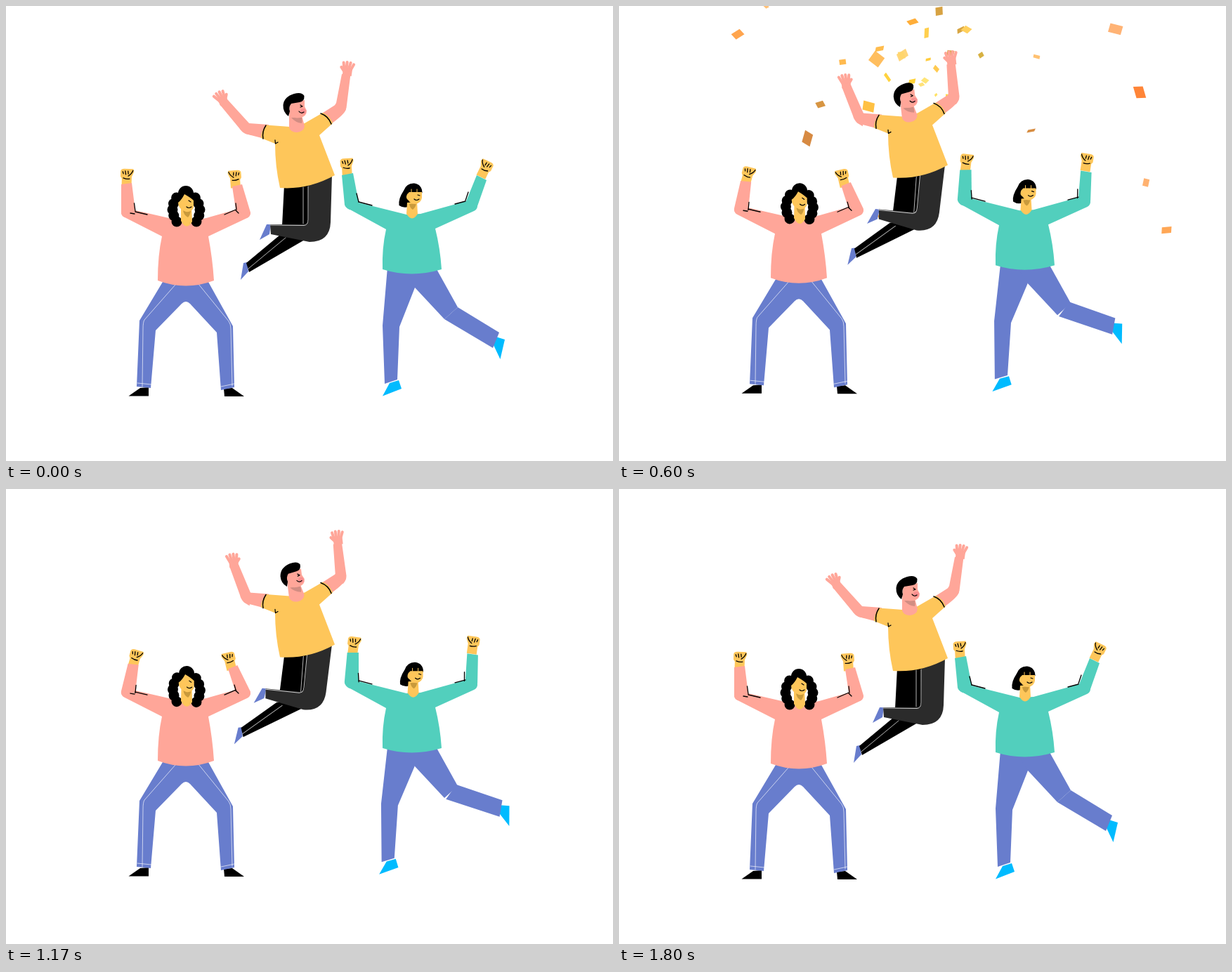
Write an HTML page with a canvas that moves like this. It is 864 px wide and 648 px high and loops after 1830 ms.

```html
<!DOCTYPE html>
<html lang="en">
<head>
<meta charset="utf-8">
<title>Celebration</title>
<style>
html, body { margin: 0; width: 100%; height: 100%; overflow: hidden; background: #fff; }
canvas { display: block; }
</style>
</head>
<body>
<canvas id="stage" width="864" height="648"></canvas>
<script>
const ctx = document.getElementById('stage').getContext('2d');
const LOOP = 1830, STEP = 30;
const PINK = '#ffa699', GOLD = '#fec65a', GREEN = '#52cfbd', BLUE = '#687dcd',
      SKY = '#00bbff', BLACK = '#000', DARK = '#2b2b2b', SHADE = '#c99a3c';

// ---- drawing helpers ----
const paths = new Map();
function path(d) {
  if (!paths.has(d)) paths.set(d, new Path2D(d));
  return paths.get(d);
}
function fill(color, d) {
  ctx.fillStyle = color;
  ctx.fill(path(d));
}
function line(d, color = BLACK, width = 1.3) {
  ctx.strokeStyle = color;
  ctx.lineWidth = width;
  ctx.stroke(path(d));
}
function dot(color, x, y, r) {
  ctx.fillStyle = color;
  ctx.beginPath();
  ctx.arc(x, y, r, 0, 7);
  ctx.fill();
}
function shift(x, y, draw) {
  ctx.save();
  ctx.translate(x, y);
  draw();
  ctx.restore();
}
function turn(x, y, deg, draw) {
  ctx.save();
  ctx.translate(x, y);
  ctx.rotate(deg * Math.PI / 180);
  ctx.translate(-x, -y);
  draw();
  ctx.restore();
}
function fist(x, y, deg, flip = 1) {
  shift(x, y, () => {
    ctx.rotate(deg * Math.PI / 180);
    ctx.scale(flip, 1);
    fill(GOLD, 'M-9,-8Q-8,-11 -4,-11L9,-11L10,-7L7,0L7,14L-7,14L-7,3L-9,0Z');
    line('M-6,-7l1,3M-2.5,-8l1,5M1.5,-8l.5,4M8.5,-9Q7,-4 2,-1M-5,2q5,2 9,1', BLACK, 1.3);
  });
}
// Open hand: four fingers fanned over a palm, thumb to one side
function hand(x, y, deg, thumb) {
  shift(x, y, () => {
    ctx.rotate(deg * Math.PI / 180);
    fill(PINK, 'M-6,2L-6,-7Q1,-13 7,-7L7,2Z');
    for (let i = 0; i < 4; i++) {
      const a = (i - 1.5) * .3 - thumb * .05;
      line(`M${(i - 1.5) * 3},-6L${17 * Math.sin(a)},${-17 * Math.cos(a)}`, PINK, 4);
    }
    line(`M${thumb * 4},-3L${thumb * 9},-9`, PINK, 4);
  });
}

// ---- woman in pink ----
function curls() {
  dot(BLACK, 256, 267, 11);
  for (const side of [-1, 1])
    for (let i = 0; i < 5; i++)
      dot(BLACK, 256 + side * (12 + 7 * Math.sin(i * .7 + .2)) + (side > 0 ? i * .5 : 0), 273 + i * 8.5, 7.5);
}

function pinkWoman(q) {
  shift(0, -5 * q, () => {
    fill(BLACK, 'M174.5,555.5L191,544L203,543L203,555.5ZM310,545L322,544L339,556L311,556Z');
    fill(BLUE, 'M223,393L190,448L186,542L206,544L213,462L250,424Q256,418 262,424L300,465L306,547L325,543L323,456L288,393Z');
    line('M241,397L197,447Q195,450 195,460L194,542M187,537L207,539M274,396L317,449Q320,453 320,460L322,541M306,542L325,538',
      'rgba(255,255,255,.65)', 1);
    turn(174, 293, 17.5 * q, () => {
      fist(172, 243, 2);
      fill(PINK, 'M164,254L179,252L184,292L182,301L169,301Q164,299 164,294Z');
    });
    turn(338, 294, -12 * q, () => {
      fist(326, 245, -4, -1);
      fill(PINK, 'M322,257L336,254L348,294Q348,299 343,302L330,302L327,290Z');
    });
    fill(PINK, 'M164,293Q164,299 169,301L222,328Q216,355 216,391Q256,406 296,391Q294,360 288,328L343,302Q348,300 348,294L327,290L285,302L264,306L249,306L184,291Z');
    turn(174, 293, 17.5 * q, () => line('M182.5,281L184,292'));
    turn(338, 294, -12 * q, () => line('M327,281L328,290'));
    line('M184,293L201,297M177,295L183,296M327,290L311,297M327,291L331,295');
    turn(257, 306, 2 * q, () => {
      curls();
      fill(GOLD, 'M249,287L249,306Q257,321 265,307L264,285Z');
      fill(SHADE, 'M252,291L263,292Q262,298 259,301Q253,298 252,291Z');
      fill(GOLD, 'M254,268Q263,273 267,277L267,287Q264,294 256,293Q245,289 245,280Q250,276 254,268Z');
      line('M260,277L263,279M257,286Q260,289 264,286', BLACK, 1.2);
    });
  });
}

// ---- woman in green ----
function greenWoman(q) {
  shift(0, -7.7 * q, () => {
    turn(560, 380, 2 * q, () => {
      fill(SKY, 'M536,555.5L546,537L559,533L563,545Z');
      fill(BLUE, 'M543,372L536,455L539,538L557,532L560,457L582,401L590,372Z');
    });
    fill(BLUE, 'M565,375L613,375L643,429L624,446L582,401Z');
    turn(634, 437, -16 * q, () => {
      fill(SKY, 'M697,471L710,475L703.5,503L694,483Z');
      fill(BLUE, 'M643,429L702,465L693,487L624,446Z');
    });
    turn(492, 281, 13.5 * q, () => {
      fist(485, 228, -3);
      fill(GREEN, 'M478,241L494,238L502,280L500,291L489,290Q483,287 482,283Z');
    });
    turn(661, 283, -23 * q, () => {
      fist(682, 231, 26, -1);
      fill(GREEN, 'M670,241L684,248L671,285Q669,291 664,292L654,288L655,278Z');
    });
    fill(GREEN, 'M482,281Q483,287 488,289L541,318Q535,345 536,375Q577,388 620,375Q618,345 611,317L666,292Q671,290 671,284L655,278L590,296L570,297L502,280Z');
    turn(492, 281, 13.5 * q, () => line('M499,267L502,279'));
    turn(661, 283, -23 * q, () => line('M658,265L654,277'));
    line('M502,279L521,284M654,278L639,282');
    shift(2 * q, .5 * q, () => {
      fill(BLACK, 'M566,263Q570,252 581,252.5Q592,254 592.5,266L586,272L573,286Q565,288 559.5,284Q558,275 566,263Z');
      fill(GOLD, 'M571,280L570,296Q578,309 586,296L585,279Z');
      fill(SHADE, 'M574,282L584,281Q583,287 579,290Q575,288 574,282Z');
      fill(GOLD, 'M574,265L592,265L592,273Q591,280 583,282Q576,282 573,277Q568,274 571,268Z');
      line('M577,261v4M585,261v4', GOLD, 1);
      line('M586,269l3,1M581,275Q584,278 588,275', BLACK, 1.2);
    });
  });
}

// ---- jumping man ----
function man(q, lift) {
  shift(0, -22 * lift, () => {
    turn(425, 262, 5.3 * q, () => {
      fill(BLUE, 'M334,390L338,366L343,365L345,378Z');
      fill(BLACK, 'M396,255L393,313L432,313L433,255ZM390,326L342,366L346,379L425,333L420,322Z');
      line('M398,330L345,374M423,258L423,310', 'rgba(255,255,255,.7)', 1);
    });
    turn(450, 240, 6.8 * q, () => {
      fill(BLUE, 'M361,333L371,311L377,311L375,325Z');
      fill(DARK, 'M430,250L464,240L462,308Q461,336 432,336L377,325L376,311L424,311Q431,311 431,304Z');
      line('M430,257L430,304Q430,312 424,312.5L376,312', 'rgba(255,255,255,.75)', 1);
    });
    fill(PINK, 'M374,169L346,167Q334,173 341,182L364,188ZM448,154L470,140L484,147Q482,154 464,167Z');
    turn(343, 175, 24.5 * q, () => {
      hand(310, 138, -28, 1);
      fill(PINK, 'M316,134L347,168L350,184L341,182Q335,179 332,174L304,140Z');
    });
    turn(477, 144, -19 * q, () => {
      hand(485, 97, 8, -1);
      fill(PINK, 'M478,97L490.5,97L484.5,145Q483,151 477,155L467,143L470,138Z');
    });
    fill(GOLD, 'M370,169.5L404,172L425,167L451,152Q461,156 465,167L446,184L468,241Q430,262 390,259Q383,228 383,196L363,188Q363,178 370,169.5Z');
    line('M370,170Q364,179 366,189M448,153Q459,157 463,168', BLACK, 1.5);
    line('M383,191L383.5,196L387,194');
    turn(414, 174, -9 * q, () => {
      fill(PINK, 'M403,155L403,173Q405,180 414,180Q424,179 425,171L421,156Z');
      fill('#d28d83', 'M406,159L421,159Q422,164 421,167Q412,166 406,159Z');
      fill(PINK, 'M404,139L425,134L425,143L428,149Q428,157 419,159Q408,161 403,154Z');
      fill(BLACK, 'M402,157Q394,151 394.5,141Q396,129 410,125Q421,122 424.5,128Q425,136 418,137L406,139Q402,144 404,150Z');
      dot('#f88f90', 423, 150, 4);
      line('M419,141L422,143L419,144M417,150Q420,154 424,151', BLACK, 1.2);
    });
  });
}

// ---- confetti: thrown outward in quick succession, warming in hue with age ----
let seed = 11;
const rnd = () => (seed = seed * 16807 % 2147483647) / 2147483647;
const COUNT = 130;
const bits = Array.from({ length: COUNT }, (_, i) => {
  const dir = Math.PI * (rnd() + rnd() - 1.5);
  return {
    born: 130 + 620 * Math.pow(i / COUNT, 1.3),
    life: 330 - 150 * Math.sin(dir),
    x: 460 + 50 * (rnd() - .5), y: 130 + 50 * (rnd() - .5),
    dir, speed: .7 + rnd(),
    size: 6 + 7 * rnd() * rnd(),
    angle: rnd() * Math.PI, rate: (rnd() - .5) * .012,
    tilt: .3 + .7 * rnd(), skew: rnd() * .6 - .3,
    tone: rnd() < .2 ? '65%,55%' : `100%,${60 + rnd() * 14}%`
  };
});

function confetti(t) {
  for (const b of bits) {
    const age = t - b.born;
    if (age <= 0 || age >= b.life) continue;
    const far = b.speed * age;
    const size = b.size * (1 + age / 300) * Math.min(1, age / 30, (b.life - age) / 50);
    shift(b.x + far * Math.cos(b.dir), b.y + far * Math.sin(b.dir), () => {
      ctx.rotate(b.angle + age * b.rate);
      ctx.transform(1, 0, b.skew, b.tilt, 0, 0);
      ctx.fillStyle = `hsl(${50 - age * .1},${b.tone})`;
      ctx.fillRect(-size / 2, -size / 2, size, size);
    });
  }
}

// ---- timing ----
const ease = u => (1 - Math.cos(Math.PI * u)) / 2;

function draw(t) {
  const q = t < 1800 ? ease(t / 900) : 0;
  const lift = ease(t < 990 ? t / 990 : Math.max(0, (1815 - t) / 825));
  ctx.fillStyle = '#fff';
  ctx.fillRect(0, 0, 864, 648);
  ctx.lineCap = ctx.lineJoin = 'round';
  confetti(t);
  man(q, lift);
  pinkWoman(q);
  greenWoman(q);
}

const start = performance.now();
function tick() {
  const t = (performance.now() - start) % LOOP;
  draw(Math.floor(t / STEP) * STEP);
  requestAnimationFrame(tick);
}
tick();
</script>
</body>
</html>
```
